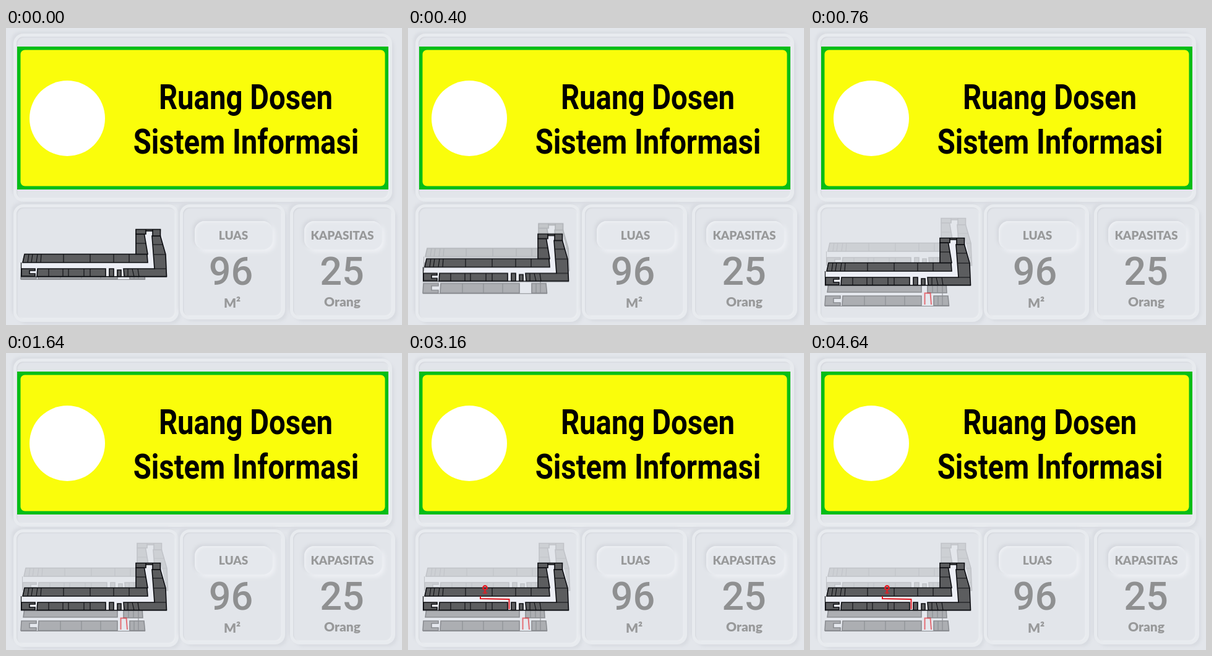
Write an HTML page without scripts that moves like this. It is 640x480 px and loops after 5120 ms.

```html
<!DOCTYPE html>
<html lang="id">
<head>
<meta charset="utf-8">
<title>Ruang Dosen</title>
<style>
  html, body { margin: 0; width: 100%; height: 100%; overflow: hidden; background: #e3e6eb; }
  .stage { position: relative; width: 640px; height: 480px; overflow: hidden; }
  .stage > * { position: absolute; box-sizing: border-box; }
  .panel {
    border-radius: 11px; background: #e2e5ea;
    box-shadow: inset 1px 1px 2px #d3d6dc, inset -1px -1px 2px #f0f2f5,
      0 0 0 5px #e8ebef, -5px -5px 4px 3px #d9dce2, 5px 5px 5px 3px #d8dbe1;
  }
  .pill {
    border-radius: 16px; background: #e5e8ed;
    box-shadow: inset 2px 2px 4px #eef0f4, -3px -3px 5px #d5d8de, 4px 4px 6px #eff1f5;
  }
  svg { left: 0; top: 0; }
  .sign { font: 700 55px Roboto, sans-serif; text-anchor: middle; }
  .label { font: 900 19px Lato, sans-serif; fill: #98999a; text-anchor: middle; }
  .unit { font-size: 21px; }
  .num { font: 500 63px Roboto, sans-serif; fill: #8f9091; text-anchor: middle; }

  .room { fill: #5c5d5f; stroke: #0b0c10; stroke-width: 1.6; }
  .floor { fill: #eceef5; }
  .wall { fill: none; stroke: #0b0c10; stroke-width: 1.1; }
  .faded { opacity: .4; }
  .route { fill: none; stroke: #e51c24; stroke-width: 2; stroke-dasharray: 1; stroke-dashoffset: 1; }

  .mid, .top, .low, .route, .pin { animation: 5120ms linear infinite; }
  .mid { animation-name: mid; }
  .top { animation-name: top; }
  .low { animation-name: low; }
  .exit { animation-name: exit; opacity: .6; }
  .way { animation-name: way; }
  .pin { animation-name: pin; }
  @keyframes mid { 0% { transform: translateY(-14px); } 14.84%, 100% { transform: none; } }
  @keyframes top {
    0% { transform: translateY(-14px); opacity: .32; }
    14.84%, 100% { transform: translate(2px, -32px); opacity: .15; }
  }
  @keyframes low { 0% { transform: translateY(-43px); } 14.84%, 100% { transform: none; } }
  @keyframes exit { 0%, 10.94% { stroke-dashoffset: 1; } 14.84%, 100% { stroke-dashoffset: 0; } }
  @keyframes way { 0%, 32.03% { stroke-dashoffset: 1; } 42.19%, 100% { stroke-dashoffset: 0; } }
  @keyframes pin {
    0%, 42.19% { opacity: 0; transform: translateY(-5px); }
    50%, 100% { opacity: 1; transform: none; }
  }
</style>
</head>
<body>
<div class="stage">
  <div class="panel" style="left:17px;top:14px;width:602px;height:262px"></div>
  <div class="panel" style="left:17px;top:290px;width:257px;height:180px"></div>
  <div class="panel" style="left:286px;top:290px;width:160px;height:176px"></div>
  <div class="panel" style="left:464px;top:290px;width:160px;height:176px"></div>
  <div class="pill" style="left:305px;top:312px;width:126px;height:46px"></div>
  <div class="pill" style="left:482px;top:312px;width:126px;height:46px"></div>

  <svg width="640" height="480" viewBox="0 0 640 480">
    <defs>
      <g id="plan">
        <path class="floor" d="M30 379H210V339H250L259 380 260 416H25L27 392Z"/>
        <path class="room" d="M30 379.500H228L229 393H27Z"/>
        <path class="room" d="M51 403H161V415.500H50Z"/>
        <path class="room" d="M190 403H240L236 350H249.500L258 380 259.500 415.500H191Z"/>
        <path class="room" d="M210 347H223.500L229 379.500H210Z"/>
        <path class="room" d="M210 339.500H226V347H210ZM226 339.500H237V342H226ZM237 339.500H249.500V350H237Z"/>
        <path class="room" d="M25 403H47V406H38V411H47V415H25Z"/>
        <path class="room" d="M167 403H174V415.500H167ZM180 405H186V415.500H180Z"/>
        <path class="wall" d="M37 379 35 393M43 379 41 393M51 379 49 393M57 379 56 393M93 379V393M136 379V393M174 379V393M199 379V393"/>
        <path class="wall" d="M69 403V416M92 403V416M101 403V416M126 403V416M136 403V416M197 403V416M204 403 207 416M213 403 215 416M240 403H259M239 380H258M237 364H254M210 362H226"/>
        <path class="wall" d="M24.500 393V416H260M161 415.500H191"/>
      </g>
    </defs>

    <path fill="#05bd17" d="M18 30H618V261H18Z"/>
    <rect x="23.500" y="35.500" width="589" height="220" rx="7" fill="#fafd0b"/>
    <circle cx="99" cy="146" r="61" fill="#fff"/>
    <g class="sign">
      <text transform="translate(387.500 131) scale(.86 1)">Ruang Dosen</text>
      <text transform="translate(388 203) scale(.86 1)">Sistem Informasi</text>
    </g>

    <g class="label">
      <text x="367.500" y="342">LUAS</text>
      <text x="543.500" y="342">KAPASITAS</text>
      <text class="unit" x="365.500" y="452">M²</text>
      <text class="unit" x="543.500" y="450">Orang</text>
    </g>
    <g class="num">
      <text x="363.500" y="415">96</text>
      <text x="543" y="415">25</text>
    </g>

    <g class="low">
      <g class="faded">
        <path class="floor" d="M27 416H221L225 450H24Z"/>
        <path class="room" d="M30 412H180V427H28ZM190 412H220L221 428H190Z"/>
        <path class="room" d="M53 433H180V448.500H52ZM200 433H223L224.500 448.500H200Z"/>
        <path class="room" d="M25 433H49V437H38V444H49V448.500H24Z"/>
        <path class="wall" d="M88 433V449M122 433V449M153 433V449M207 433V449M214 412V449M198 412V428M206 412V428M24 449.500H225"/>
      </g>
      <path class="route exit" pathLength="1" d="M185.500 447V428.500H194.500L196 447"/>
    </g>
    <use class="top" href="#plan"/>
    <g class="mid">
      <use href="#plan"/>
      <path class="route way" pathLength="1" d="M163.500 414V398L117 397V393"/>
      <g class="pin" fill="none" stroke="#e51c24">
        <circle cx="124.500" cy="379.500" r="3.200" stroke-width="2.400"/>
        <path stroke-width="2" d="M124.500 383V388"/>
        <ellipse cx="124.500" cy="387.500" rx="3.500" ry="1.300"/>
      </g>
    </g>
  </svg>
</div>
</body>
</html>
```
